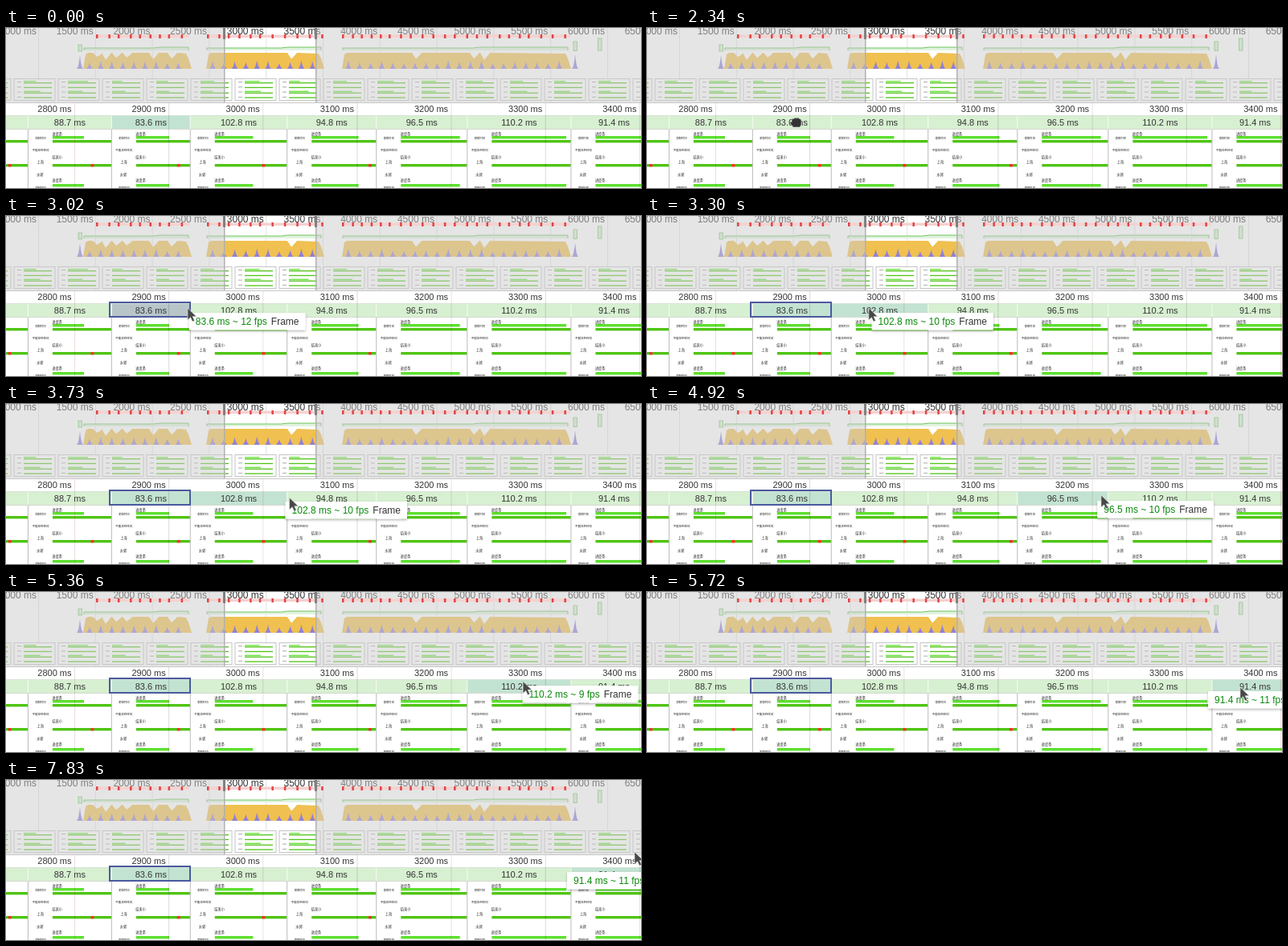
These frames come from a looping animation (790x200 px, 7870 ms). An HTML page:

```html
<!DOCTYPE html>
<html lang="en">
<head>
<meta charset="utf-8">
<title>Frame timeline</title>
<style>
html, body { margin: 0; width: 100%; height: 100%; overflow: hidden; background: #fff; }
svg { display: block; }
text { font-family: "Liberation Sans", Arial, sans-serif; fill: #333; }
.tiny { font-family: "Noto Sans CJK SC", "Noto Sans CJK", sans-serif; fill: #222; }
</style>
</head>
<body>
<svg id="stage" width="790" height="200" viewBox="0 0 790 200">
  <defs>
    <filter id="shadow" x="-10%" y="-40%" width="120%" height="190%">
      <feDropShadow dx="0" dy="1.5" stdDeviation="1.6" flood-color="#000" flood-opacity=".3"/>
    </filter>
  </defs>
  <g id="overview"></g>
  <g id="detail"></g>
  <g id="tip">
    <rect id="tipBox" height="21.5" rx="1" fill="#fff" filter="url(#shadow)"/>
    <text y="15" x="8" font-size="12"><tspan id="tipTime" fill="#0b8a0b"></tspan><tspan dx="5">Frame</tspan></text>
  </g>
  <path id="arrow" d="M0 0V15L3.6 11.8 6 17 8.6 15.8 6.2 10.7H11Z" fill="#484848" stroke="#ddd" stroke-width=".7"/>
  <path id="hand" d="M-5 -3Q-4 -6 -2 -4.5Q-1 -7 1 -5Q3 -7 4.5 -4.5Q7 -5 7 -2V2Q7 4 5 6H-3.5Q-4 3.5 -7 1.5Q-8 -1 -5 -.5Z" fill="#333" stroke="#ddd" stroke-width=".6"/>
</svg>
<script>
const LOOP = 7870, STEP = 40;
const PRESS = 2340, RELEASE = 2420, TIP_SHOWN = 2540;
const PX_PER_MS = 1.1715;
const PICKED = 2;
const GREEN = '#4fc414', LIGHT = '#5de02f', PURPLE = '#9080d8';

const $ = id => document.getElementById(id);
const times = (n, fn) => Array.from({ length: n }, (_, i) => fn(i)).join('');
const rect = (x, y, w, h, fill, more = '') =>
  `<rect x="${x}" y="${y}" width="${w}" height="${h}" fill="${fill}" ${more}/>`;
const label = (x, y, size, str, more = '') =>
  `<text x="${x}" y="${y}" font-size="${size}" ${more}>${str}</text>`;

let seed = 7;
const random = () => (seed = seed * 16807 % 2147483647) / 2147483647;

// Cell widths follow from the frame durations.
const cells = [];
[88.3, 88.7, 83.6, 102.8, 94.8, 96.5, 110.2, 91.4].reduce((x, ms) => {
  const w = ms * PX_PER_MS;
  cells.push({ x, w, ms, name: ms.toFixed(1) + ' ms' });
  return x + w;
}, -76);

function bump(x, h, half = 4) {
  return `<path d="M${x - half} 51Q${x - 1.5} 49 ${x} ${51 - h}Q${x + 1.5} 49 ${x + half} 51Z" fill="${PURPLE}"/>`;
}

// One busy stretch: frame ticks, frame-rate strip and load area with notches.
function activity(from, to, notches) {
  const dips = notches.map(x => {
    const depth = 5 + random() * 4;
    return `L${x - 5} 31L${x} ${31 + depth}L${x + 4} ${32 + depth / 3}L${x + 7} 31`;
  }).join('');
  const mid = (from + to) / 2 + 20;
  let s = `<path d="M${from} 51L${from + 3} 33L${from + 6} 31${dips}L${to - 7} 32L${to - 4} 38L${to} 51Z" fill="#f0c050"/>`;
  s += `<path d="M${from + 1} 28V25H${mid}L${mid + 8} 24H${to - 4}V28" fill="#e0f3de" stroke="#6cc35c"/>`;
  for (let x = from + 8; x < to - 5; x += 13.8) s += bump(x, 6 + random() * 5);
  return s;
}

function ticks(from, to) {
  let s = rect(from, 8.5, to - from, 3.5, '#f6d0d0');
  for (let x = from; x < to; x += 11 + random() * 5) s += rect(x, 8, 2.5, 5, '#e04444');
  return s;
}

function thumb(i) {
  const x = -45 + i * 55;
  const bar = (y, w, c) => rect(x + 12, y, w, 1.3, c);
  return rect(x, 63.5, 51, 27, '#fff', 'stroke="#c4c4c4"') +
    times(4, k => rect(x + 4, 67 + k * 6.3, 5, 1, '#aaa') +
      (k % 2 ? bar(67.5 + k * 6.3, 35, GREEN) : bar(66 + k * 6.3, 10 + random() * 16, LIGHT) + bar(68 + k * 6.3, 35, GREEN)));
}

function drawOverview() {
  const gridX = i => 40 + i * 70.8;
  let s = rect(0, 0, 790, 94, '#fff');
  s += times(12, i => rect(gridX(i), 0, 1, 94, '#e2e2e2'));
  s += activity(96, 231, [113, 124, 137, 150, 183, 206]);
  s += activity(249, 396, [355]);
  s += activity(418, 703, [510, 582, 595]);
  s += bump(92, 17) + bump(708, 18);
  s += [90, 706, 736.5].map((x, i) =>
    rect(x, 21 - i * 4, 4.5, 8 + i * 3.5, '#d8f0d4', 'stroke="#6cc35c" stroke-width=".8"')).join('');
  s += times(16, thumb);
  s += times(12, i => label(-8 + i * 70.7, 8, 12, `${1000 + i * 500} ms`));

  const veil = 'rgba(204,204,204,.5)';
  s += rect(0, 0, 272, 94, veil) + rect(386, 0, 404, 94, veil);
  s += ticks(112, 228) + ticks(250, 394) + ticks(418, 702);
  s += [272, 386].map(x => rect(x - 1, 0, 1.5, 94, '#b0b0b0') + rect(x - 2, 0, 3, 14, '#808080')).join('');
  s += rect(0, 93, 790, 1, '#c8c8c8');
  $('overview').innerHTML = s;
}

// The page inside each frame: its progress bar grows from shot to shot.
function shot({ x, w }, i) {
  const n = i - 1, done = 39 + 2.15 * n * n;
  const tiny = (dx, y, size, str) => label(x + dx, y, size, str, 'class="tiny"');
  let s = rect(x, 127, w, 73, '#fff');
  s += [135, 195].map(y => rect(x + 30.5, y, done, 3.5, LIGHT)).join('');
  s += [140, 170].map(y => rect(x + 30.5, y, w - 30.5, 3.4, GREEN)).join('');
  s += rect(x + done + 39 + 1.3 * n, 170, 4, 3.4, '#ff3030');
  s += [139, 201].map(y => tiny(9, y, 3.3, '限制时间')).join('');
  s += tiny(5, 154, 3.5, '不能找到任何') + tiny(11, 169, 4.2, '上海') + tiny(10.5, 185, 4.2, '水郭');
  s += ['进度条', '结束小', '进度条'].map((str, k) => tiny(30, 133.5 + k * 29, 4.2, str)).join('');
  return s + rect(x - .5, 127, 1, 73, '#bbb');
}

function drawDetail() {
  const gap = 100 * PX_PER_MS;
  let s = rect(0, 94, 790, 106, '#fff');
  s += cells.map((c, i) => rect(c.x, 109.5, c.w, 16.5, '#d7f0d1', `id="cell${i}"`) +
    rect(c.x - .5, 109, 1, 17, '#f4fbf2') + shot(c, i)).join('');
  s += rect(0, 109, 790, .7, '#d0dccd') + rect(0, 126, 790, 1, '#d4d8d2');
  s += times(7, i => rect(85 + i * gap, 94, 1, 106, i % 2 ? '#000' : '#803020', 'opacity=".15"') +
    label(39.3 + i * gap, 105, 11, `${2800 + i * 100} ms`));
  s += cells.map(c => label(c.x + c.w / 2, 122, 11, c.name, 'text-anchor="middle"')).join('');
  s += rect(129, 108, 100, 18, 'none', 'id="picked" stroke="#4a5a9e" stroke-width="2"');
  $('detail').innerHTML = s;
}

// Pointer strokes: each runs from the previous end to x, y.
const MOVES = [
  { start: 2380, end: 2420, x: 185, y: 105, power: 1 },
  { start: 2420, end: 2630, x: 183, y: 115, power: 1 },
  { start: 2820, end: 3570, x: 305, y: 115, power: 1.4 },
  { start: 3610, end: 3890, x: 397, y: 119, power: 1.3 },
  { start: 4060, end: 4540, x: 497, y: 119, power: 1 },
  { start: 4720, end: 5040, x: 622, y: 110, power: .8 },
  { start: 5280, end: 5720, x: 738, y: 119, power: 1 },
  { start: 7740, end: 7820, x: 782, y: 90, power: .6 }
];

function pointer(t) {
  const n = Math.max(1, MOVES.filter(m => m.start <= t).length - 1);
  const a = MOVES[n - 1], b = MOVES[n];
  const spent = Math.max(0, Math.floor((t - b.start) / STEP) * STEP);
  const k = 1 - (1 - Math.min(1, spent / (b.end - b.start))) ** b.power;
  return [a.x + (b.x - a.x) * k, a.y + (b.y - a.y) * k];
}

const show = (el, on) => el.setAttribute('visibility', on ? 'visible' : 'hidden');
const place = (el, x, y) => el.setAttribute('transform', `translate(${x} ${y})`);

function render(t) {
  const clicked = t >= RELEASE, pressed = t >= PRESS && !clicked;
  const [px, py] = pointer(t);
  // The page reacts one step behind the pointer.
  const [hx, hy] = pointer(t - STEP);
  const under = cells.findIndex(c => hx < c.x + c.w);

  cells.forEach((c, i) => {
    const picked = clicked && i === PICKED, hot = !pressed && i === under;
    $('cell' + i).setAttribute('fill', picked && hot ? '#b7c5c9' : picked || hot ? '#c3e3d2' : '#d7f0d1');
  });
  show($('picked'), clicked);
  show($('hand'), pressed);
  place($('hand'), 185, 118);
  show($('arrow'), clicked);
  place($('arrow'), px, py);

  const { ms, name } = cells[under];
  show($('tip'), t >= TIP_SHOWN);
  place($('tip'), Math.min(hx + 10, 698), Math.round(hy + 6));
  $('tipTime').textContent = `${name} ~ ${Math.round(1000 / ms)} fps`;
  $('tipBox').setAttribute('width', $('tip').lastElementChild.getComputedTextLength() + 21);
}

drawOverview();
drawDetail();
const begin = performance.now();
function tick() {
  render((performance.now() - begin) % LOOP);
  requestAnimationFrame(tick);
}
render(0);
requestAnimationFrame(tick);
</script>
</body>
</html>
```
